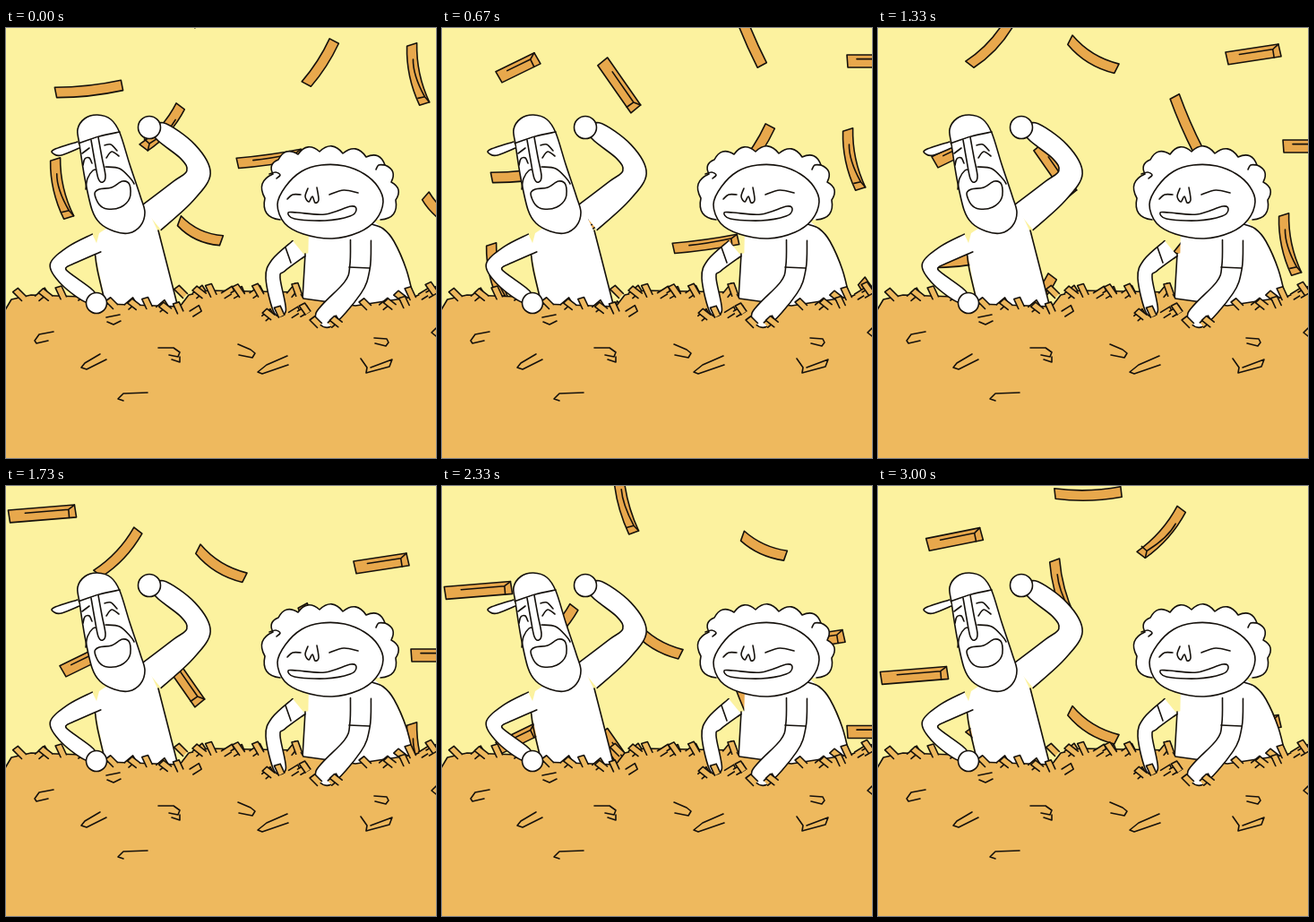
An HTML page with a canvas that plays this animation: 480x480 px, repeating every 3140 ms.

```html
<!DOCTYPE html>
<html>
<head>
<meta charset="utf-8">
<style>
html, body { margin: 0; width: 100%; height: 100%; overflow: hidden; background: #fcf29f; }
canvas { display: block; width: 480px; height: 480px; }
</style>
</head>
<body>
<canvas id="stage" width="480" height="480"></canvas>
<script>
const ctx = document.getElementById('stage').getContext('2d');
const SKY = '#fcf29f', PILE = '#eeb95e', FRY = '#e8a84c', INK = '#15110c', WHITE = '#fff';
const LOOP = 3140, STEP = 1000 / 15, LAST = 45, FALL = 0.1425;

function paint(fill, stroke = true) {
  if (fill) { ctx.fillStyle = fill; ctx.fill(); }
  if (stroke) ctx.stroke();
}

// Smooth curve through a flat list of points
function curve(p, fill, close) {
  const n = p.length / 2;
  const at = i => {
    i = close ? (i + n) % n : Math.max(0, Math.min(n - 1, i));
    return [p[2 * i], p[2 * i + 1]];
  };
  ctx.beginPath();
  ctx.moveTo(p[0], p[1]);
  for (let i = 0; i < (close ? n : n - 1); i++) {
    const a = at(i - 1), b = at(i), c = at(i + 1), d = at(i + 2);
    ctx.bezierCurveTo(b[0] + (c[0] - a[0]) / 6, b[1] + (c[1] - a[1]) / 6,
      c[0] - (d[0] - b[0]) / 6, c[1] - (d[1] - b[1]) / 6, c[0], c[1]);
  }
  paint(fill);
}

function poly(p, fill, stroke) {
  ctx.beginPath();
  for (let i = 0; i < p.length; i += 2) ctx.lineTo(p[i], p[i + 1]);
  paint(fill, stroke);
}

function disc(x, y, r) {
  ctx.beginPath();
  ctx.arc(x, y, r, 0, 7);
  paint(WHITE);
}

// Tapering limb around a centre line, open at the first point
function limb(p, w1, w2) {
  const left = [], right = [], n = p.length;
  for (let i = 0; i < n; i += 2) {
    const a = Math.max(0, i - 2), b = Math.min(n - 2, i + 2);
    const dx = p[b] - p[a], dy = p[b + 1] - p[a + 1];
    const k = (w1 + (w2 - w1) * i / (n - 2)) / 2 / Math.hypot(dx, dy);
    left.push(p[i] + dy * k, p[i + 1] - dx * k);
    right.unshift(p[i] - dy * k, p[i + 1] + dx * k);
  }
  curve(left.concat(right), WHITE);
}

// Row of outward bumps
function scallop(p) {
  ctx.beginPath();
  ctx.moveTo(p[0], p[1]);
  for (let i = 2; i < p.length; i += 2) {
    const dx = p[i] - p[i - 2], dy = p[i + 1] - p[i - 1];
    const mx = p[i] - dx / 2 + dy * 0.55, my = p[i + 1] - dy / 2 - dx * 0.55;
    ctx.bezierCurveTo((p[i - 2] + 2 * mx) / 3, (p[i - 1] + 2 * my) / 3,
      (p[i] + 2 * mx) / 3, (p[i + 1] + 2 * my) / 3, p[i], p[i + 1]);
  }
  paint(WHITE);
}

// Fry from end to end; face draws the cut at the far end
function fry(x1, y1, x2, y2, bend = 0, face = !bend, w = bend ? 11.5 : 14) {
  const len = Math.hypot(x2 - x1, y2 - y1), m = len / 2, h = w / 2;
  ctx.save();
  ctx.translate(x1, y1);
  ctx.rotate(Math.atan2(y2 - y1, x2 - x1));
  ctx.beginPath();
  ctx.moveTo(0, -h);
  ctx.quadraticCurveTo(m, -h + 2 * bend, len, -h);
  ctx.lineTo(len + 1, h);
  ctx.quadraticCurveTo(m, h + 2 * bend, 1, h);
  ctx.closePath();
  paint(FRY);
  if (face) {
    ctx.beginPath();
    ctx.moveTo(m / 2, bend - h / 3);
    ctx.quadraticCurveTo(m, 2 * bend - h / 3, len - 7, -h / 3);
    ctx.lineTo(len - 7, h);
    ctx.moveTo(len - 7, -h / 3);
    ctx.lineTo(len, -h);
    ctx.stroke();
  }
  ctx.restore();
}

// Ends at time zero, bend, cut face
const early = [
  [55, 72, 129, 64, 2],
  [195, 87, 154, 133, -4, 1],
  [179, -58, 216, -5],
  [335, 63, 366, 15, 2],
  [453, 18, 467, 84, 4, 1],
  [258, 151, 330, 141, 1, 1],
  [468, 187, 492, 212, 2],
  [55, 146, 70, 211, 4, 1],
  [193, 215, 240, 237, 5],
  [63, -40, 106, -61]
];
const late = [
  [452, -58, 496, -58],
  [331, -114, 357, -54, 1],
  [3, -213, 77, -219],
  [102, -149, 147, -197, 4],
  [214, -177, 266, -145, 5],
  [389, -156, 448, -165],
  [197, -345, 214, -281, 3, 1],
  [335, -277, 383, -255, 4],
  [55, -362, 115, -374],
  [339, -402, 294, -351, -4, 1],
  [197, -419, 271, -421, 3]
];

// Sticks poking out of the heap between two x positions
const lean = [-45, 50, -52, -25, 58, 60, -35, 55, -30, 45, -45, 40, -20];
function row(x1, x2, count, y1, y2, len = 14, skip = 0) {
  for (let i = 0; i < count; i++) {
    const k = i / (count - 1);
    ctx.save();
    ctx.translate(x1 + (x2 - x1) * k, y1 + (y2 - y1) * k);
    ctx.rotate(lean[(i + skip) % lean.length] * Math.PI / 180);
    poly([-3.5, 0, -3.5, -len, 3.5, 1 - len, 3.5, 0], PILE);
    ctx.restore();
  }
}

function heap() {
  poly([-4, 320, 6, 303, 28, 298, 85, 300, 112, 308, 194, 311, 204, 298, 226, 293,
    328, 295, 332, 302, 390, 310, 456, 300, 484, 288, 484, 484, -4, 484], PILE);
  row(20, 79, 5, 302, 301);
  row(200, 327, 13, 299, 298);
  row(446, 479, 5, 304, 296, 14, 2);
  poly([53, 339, 37, 342, 32, 349, 34, 352, 47, 349]);
  poly([112, 370, 90, 381, 84, 379, 88, 374, 105, 364]);
  poly([112, 323, 127, 320]);
  poly([113, 328, 120, 331, 128, 327]);
  poly([170, 357, 187, 357, 194, 362, 192, 367, 182, 365]);
  poly([194, 367, 194, 373, 185, 370]);
  poly([259, 353, 273, 359, 278, 363, 275, 368, 260, 365]);
  poly([314, 366, 291, 376, 281, 384, 286, 386, 315, 376]);
  poly([396, 369, 403, 379, 402, 385, 428, 378, 431, 370, 407, 379]);
  poly([411, 346, 425, 347, 427, 351, 424, 355, 412, 352]);
  poly([158, 407, 131, 408, 125, 414, 131, 416]);
  poly([480, 335, 475, 340, 480, 344]);
}

function frontSticks(up) {
  row(122, 160, 4, 311, 312, 12);
  row(170, 207, 4, 314, 319, 12, 1);
  if (up) {
    row(334, 390, 6, 304, 313, 12, 3);
    row(400, 447, 5, 314, 308, 12, 1);
  } else {
    row(288, 337, 6, 324, 318, 12, 1);
    row(350, 373, 3, 332, 331, 12);
    row(405, 447, 4, 312, 311, 12);
  }
}

function shifted(x, y, sy, part) {
  ctx.save();
  ctx.translate(x, y);
  ctx.scale(1, sy);
  part();
  ctx.restore();
}

function manBody(up) {
  shifted(up ? -2 : 0, up ? -5 : 0, 1, () => {
    poly([112, 312, 99, 248, 104, 229, 155, 196, 170, 228, 180, 265, 193, 316], WHITE, false);
    curve([112, 312, 102, 270, 99, 248]);
    curve([170, 226, 180, 265, 193, 316]);
    limb([162, 212, 198, 182, 215, 161, 203, 138, 170, 113], 35, 18);
    disc(160, 111, 12.5);
  });
}

function manFront(up) {
  shifted(up ? -1 : 0, up ? -4 : 0, 1, () => {
    limb([101, 240, 74, 253, 58, 266, 68, 281, 95, 301], 22, 14);
    disc(101, 307, 11.5);
  });
  shifted(up ? 3.5 : 0, up ? 16.5 : 0, up ? 0.96 : 1, () => {
    curve([82, 130, 88, 168, 96, 203, 105, 218, 121, 227, 137, 229, 150, 221, 155, 206,
      150, 188, 138, 152, 127, 117, 117, 102, 102, 97, 88, 101, 80, 113], WHITE, true);
    curve([89, 180, 91, 168, 97, 159, 103, 158]);
    curve([111, 155, 127, 157, 139, 168, 143, 174]);
    curve([80, 129, 104, 121, 127, 116]);
    curve([80, 127, 53, 136, 54, 141, 62, 142, 82, 134], WHITE);
    curve([95, 125, 99, 148, 103, 168, 108, 172, 111, 165, 107, 144, 103, 122], WHITE);
    curve([86, 153, 88, 146, 93, 145, 96, 151]);
    curve([112, 145, 118, 138, 126, 143]);
    curve([85, 140, 93, 134]);
    curve([110, 131, 117, 130, 124, 137]);
  });
  curve(up
    ? [102, 201, 110, 195, 126, 191, 137, 184, 141, 188, 135, 197, 122, 206, 108, 209]
    : [99, 185, 104, 180, 118, 178, 130, 171, 138, 175, 138, 190, 128, 200, 113, 202, 104, 197], WHITE, true);
}

function womanBody(up) {
  shifted(up ? -5 : 0, 0, 1, () => {
    poly([336, 306, 338, 225, 410, 215, 430, 232, 447, 270, 456, 308, 390, 314], WHITE, false);
    curve([408, 219, 421, 224, 433, 238, 447, 270, 456, 306]);
  });
  poly([331, 303, 334, 252, 345, 250, 345, 306], WHITE, false);
  curve([334, 252, 331, 303]);
}

function womanUp() {
  limb([338, 223, 320, 223, 286, 218, 267, 203, 253, 179], 21, 11);
  poly([321, 213, 320, 233]);
  disc(247, 174, 10.5);
  limb([372, 235, 350, 247, 320, 256, 288, 248, 262, 234], 18, 15);
  poly([350, 238, 351, 256]);
  disc(256, 229, 11.5);
  scallop([321, 193, 299, 176, 299, 150, 304, 127, 323, 113, 338, 99, 364, 96, 401, 101,
    425, 120, 434, 142, 436, 160, 429, 190, 423, 212, 398, 213]);
  curve([388, 119, 360, 112, 335, 122, 318, 148, 320, 180, 336, 205, 362, 219, 386, 217, 398, 211], WHITE);
  curve([388, 119, 383, 138, 388, 152, 385, 163, 391, 175, 389, 184, 399, 193, 396, 212]);
  curve([328, 151, 335, 148, 346, 163, 367, 171, 374, 182, 369, 194, 356, 199, 340, 193, 330, 177], WHITE, true);
  curve([350, 126, 358, 127, 361, 133]);
  curve([354, 137, 348, 147, 353, 150, 349, 156, 356, 158, 364, 151]);
  curve([368, 158, 375, 155, 379, 161]);
  curve([372, 166, 379, 166, 380, 174]);
  curve([302, 129, 308, 125, 313, 129, 308, 134, 304, 131]);
  curve([428, 153, 433, 149, 439, 152, 436, 157]);
}

function womanDown() {
  limb([327, 246, 304, 265, 298, 279, 306, 317], 22, 13);
  poly([312, 245, 318, 262]);
  limb([396, 237, 395, 267, 387, 290, 354, 326], 23, 22);
  poly([383, 267, 406, 268]);
  scallop([306, 214, 289, 190, 298, 163, 304, 147, 326, 141, 350, 138, 376, 140, 402, 144,
    423, 153, 430, 172, 435, 192, 418, 214]);
  curve([303, 197, 312, 177, 330, 160, 352, 153, 378, 154, 400, 163, 415, 177, 421, 194,
    413, 214, 394, 228, 364, 235, 332, 230, 311, 218], WHITE, true);
  curve([294, 163, 301, 161, 306, 164, 302, 168]);
  curve([423, 153, 416, 153, 413, 158]);
  curve([314, 191, 320, 186, 329, 186]);
  curve([361, 186, 377, 181, 393, 184]);
  curve([337, 179, 334, 188, 338, 194, 342, 188, 345, 195, 349, 192, 347, 178]);
  curve([315, 206, 325, 206, 356, 208, 385, 199, 391, 203, 384, 210, 356, 215, 322, 213], WHITE, true);
}

function toss(x, y, dx, dy, bend) {
  fry(x - dx, y - dy, x + dx, y + dy, bend, false, 8);
}

function draw(ms) {
  const step = Math.min(LAST, Math.floor((ms + 5) / STEP));
  const phase = step % 9, up = phase >= 3 && phase <= 6;
  ctx.fillStyle = SKY;
  ctx.fillRect(0, 0, 480, 480);
  ctx.strokeStyle = INK;
  ctx.lineWidth = 1.6;
  ctx.lineJoin = ctx.lineCap = 'round';
  ctx.save();
  ctx.translate(0, step * STEP * FALL);
  for (const f of early) fry(...f);
  for (const f of late) fry(...f);
  ctx.restore();
  if (up) {
    toss(92, 83, 13, -1, 0);
    toss(180, 64, 6, 14, -3);
    toss(225, 92, 11, -9, -2);
    toss(251, 122, 6, -12, 2);
    toss(206, 231, 6, -12, -2);
  }
  manBody(up);
  womanBody(up);
  heap();
  if (up) womanUp(); else womanDown();
  frontSticks(up);
  manFront(up);
}

function tick(now) {
  draw(now % LOOP);
  requestAnimationFrame(tick);
}
draw(0);
requestAnimationFrame(tick);
</script>
</body>
</html>
```
